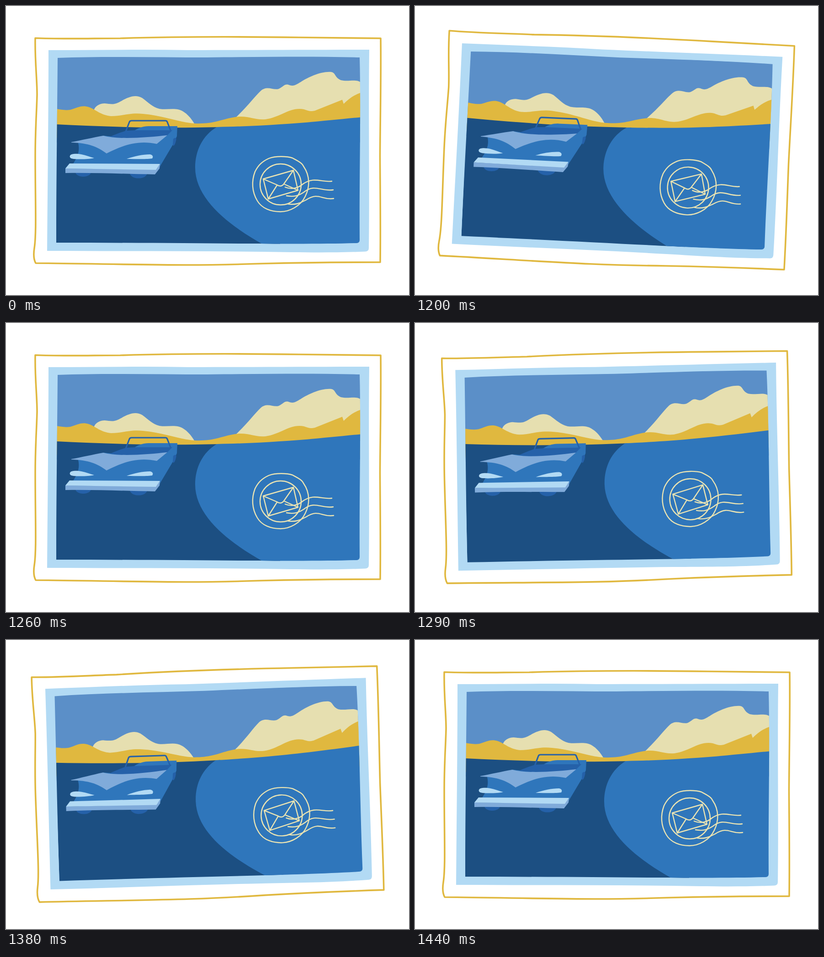
Recreate the animation shown at these times as an HTML page. Size 882 by 635 pixels, loop 1540 ms.

```html
<!DOCTYPE html>
<html lang="en">
<head>
<meta charset="utf-8">
<title>Postcard</title>
<style>
  html, body { margin: 0; width: 100%; height: 100%; overflow: hidden; background: #fff; }
  svg { display: block; width: 882px; height: 635px; }
  .sky { fill: #5b8fc8; }
  .cream { fill: #e6dfb0; }
  .gold { fill: #e0b83f; }
  .navy { fill: #1c4f82; }
  .blue { fill: #2f76bb; }
  .deep { fill: #2561a9; }
  .soft { fill: #80abda; }
  .pale { fill: #b2daf4; }
  .line { fill: none; stroke-linecap: round; stroke-linejoin: round; }
  .border { stroke: #e0b83f; stroke-width: 3.6; }
  .screen { stroke: #2561a9; stroke-width: 3.2; }
  .stamp { stroke: #ebe4b2; stroke-width: 2.4; }
</style>
</head>
<body>
<svg viewBox="0 0 882 635">
  <defs>
    <clipPath id="view">
      <path d="M113 114C220 110 330 113 440 113C560 112 660 110 774 113C777 230 773 380 774 514Q774 520 768 521C640 525 400 520 110 520C110 380 112 250 113 114Z"/>
    </clipPath>
  </defs>
  <g id="card">
    <path class="line border" d="M64 70.500C120 73 190 71 250 71C380 67 500 67 640 69L820 71C821 160 819 250 818.500 330C819 420 820 480 819 563C730 563 640 564 560 566C500 568 450 569 395 569C300 569 180 566 65 565C60 556 60 545 62 532C67 500 64 430 64 330C64 270 67 235 68 195C68 160 63 120 64 71Z"/>
    <path class="pale" d="M93 97C200 97 300 95 400 97C550 97 670 96 795 96C793 240 796 400 794 532Q794 539 787 539.500C700 543 640 541 560 540C400 538 250 539 90 538C91 390 93 250 93 97Z"/>
    <g clip-path="url(#view)">
      <path class="sky" d="M100 100H785V300H100Z"/>
      <path class="cream" d="M500 248L506 242C530 219 545 198 558 186C572 174 585 186 597 182C608 177 609 171 618 173C628 177 632 175 645 167C662 156 690 143 712 145C722 147 719 157 733 163C750 167 768 159 778 169V260H500Z"/>
      <path class="cream" d="M193 227C197 218 207 214 216 214C232 216 238 217 250 210C266 201 282 193 298 202C312 212 320 222 336 226C355 229 372 222 388 232C398 238 407 249 413 260H190Z"/>
      <path class="gold" d="M108 226C118 227 128 230 141 228C155 224 165 217 181 222C196 227 207 240 230 242C255 242 270 234 300 237C345 241 380 256 413 258C460 260 475 246 510 243C535 242 545 251 568 249C600 245 622 221 652 227C664 231 666 232 676 230L736 206L739 215C750 204 762 195 778 190V290H108Z"/>
      <path class="navy" d="M100 259.500C200 265 310 268 413 267L470 266L600 300V530H100Z"/>
      <path class="blue" d="M461 266C600 263 690 253 780 244V530H574L561 523C490 483 414 425 414 355C414 318 430 285 461 266Z"/>
    </g>

    <ellipse class="deep" cx="169" cy="365" rx="17" ry="10"/>
    <ellipse class="deep" cx="290" cy="367" rx="19" ry="11.500"/>
    <path class="blue" d="M158 301C162 318 157 332 146 348H336V354L368 300L374 286L375 264H353L312 264C300 264 290 268 282 273L235 287L214 285Z"/>
    <path class="deep" d="M228 287C240 282 252 277 264 274L282 273H364L352 285C320 287 270 295 228 287Z"/>
    <path class="soft" d="M143 299C165 295 190 289 213 285C245 294 310 289 353 284L330 303C285 293 250 309 220 324C200 309 180 301 143 300Z"/>
    <path class="deep" d="M366 292C373 287 374 291 371 300C369 307 366 309 365 305Z"/>
    <path class="line screen" d="M262 276L270 255Q271 252 275 252L349 252Q352 252 353 255L360 273"/>
    <path class="pale" d="M140 329C142 324 155 324 165 326C175 328 185 332 193 334C180 337 160 337 148 336C140 335 139 332 140 329Z"/>
    <path class="pale" d="M264 336C280 330 300 326 315 326C321 327 323 331 320 335C310 337 285 336 264 336Z"/>
    <path class="soft" d="M130 357L328 359L337 347L336 357L326 370C260 369 200 366 130 367Z"/>
    <path class="pale" d="M139 346L337 347L328 360L130 357Z"/>

    <g class="line stamp">
      <path d="M575 335C590 329 615 330 627 334C640 341 648 345 651 352C667 375 664 400 655 418C645 440 620 452 601 452C580 452 560 445 550 428C538 408 537 385 545 364C552 350 560 342 575 335Z"/>
      <circle cx="601" cy="392" r="45"/>
      <path d="M563 380L629 361L639 405L574 424ZL593 393Q602 399 608 391L629 361M593 394L574 424M608 391L639 405"/>
      <path d="M611 398C625 404 640 400 650 391C675 374 690 388 713 385"/>
      <path d="M614 417C630 420 640 417 652 409C675 390 690 408 716 404"/>
      <path d="M617 435C635 438 645 432 657 426C685 408 690 427 717 423"/>
    </g>
  </g>
</svg>
<script>
  const LOOP = 1540, START = 1170, STEP = 30;
  // Degrees held for each step of the wobble.
  const tilts = [1.25, 2.5, 1.25, 0, -1.25, -1.88, -2.5, -1.88, -1.25, 0];
  const card = document.getElementById("card");
  const begin = performance.now();

  function draw(now) {
    const time = Math.max(0, now - begin) % LOOP;
    const tilt = tilts[Math.floor((time - START) / STEP)] || 0;
    const lift = tilt < 0 ? -1.3 : 0; // the backward swing sits slightly higher
    card.setAttribute("transform", `translate(0 ${lift}) rotate(${tilt} 441 317.5)`);
    requestAnimationFrame(draw);
  }
  draw(begin);
</script>
</body>
</html>
```
